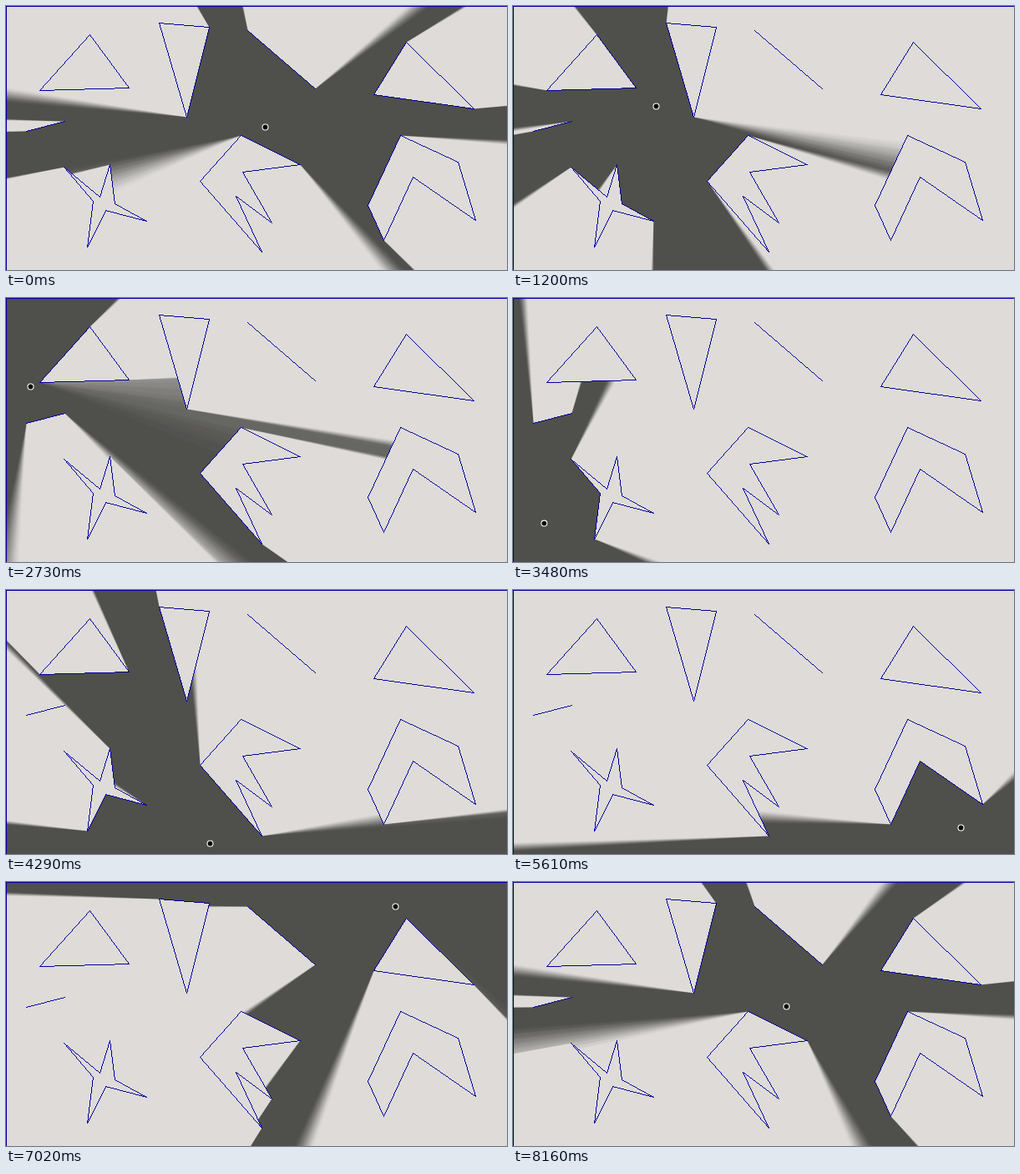
These frames come from a looping animation (600 by 317 pixels, 8.19 s). An HTML page with a canvas:

```html
<!DOCTYPE html>
<html lang="en">
<head>
<meta charset="utf-8">
<title>Soft visibility</title>
<style>
html, body { margin: 0; width: 100%; height: 100%; overflow: hidden; background: #dedbd9; }
canvas { display: block; }
</style>
</head>
<body>
<canvas id="stage" width="600" height="317"></canvas>
<script>
const W = 600, H = 317, LOOP = 8190, STEP = 30;
const LIGHT = '#dedbd9', DARK = '#4f4f4c', LINE = '#000099';
const SAMPLES = 51, RADIUS = 4.2;

const shapes = [
  [[0, 0], [W, 0], [W, H], [0, H]],
  [[100, 34], [147, 98], [40, 101]],
  [[183, 20], [243, 25], [216, 133]],
  [[289, 29], [370, 99]],
  [[479, 43], [560, 123], [440, 106]],
  [[24, 150], [70, 138]],
  [[69, 193], [112, 229], [124, 190], [130, 237], [168, 258], [119, 245], [97, 289], [104, 234]],
  [[281, 155], [352, 190], [283, 199], [318, 260], [275, 228], [306, 295], [232, 210]],
  [[472, 155], [541, 187], [562, 257], [487, 205], [452, 281], [433, 239]]
];

// time in ms, x, y, velocity in pixels per step
const path = [
  [0, 310, 145, -3, 0],
  [1200, 171, 120, 0, -4],
  [1950, 98, 15, -5, 0],
  [2730, 29, 106, -1.5, 4.5],
  [3060, 12, 160, 0, 7],
  [3750, 90, 304, 8, 0],
  [4290, 244, 304, 5, 0],
  [5610, 536, 285, 5.5, -0.5],
  [5970, 586, 215, 1, -7.5],
  [7020, 466, 29, -4, -0.5],
  [8160, 327, 149, -3.5, 1.2]
];

function makeCanvas() {
  const c = document.createElement('canvas');
  c.width = W;
  c.height = H;
  return c;
}

const ctx = document.getElementById('stage').getContext('2d');
const mask = makeCanvas(), mctx = mask.getContext('2d');

const points = shapes.flat().map(([x, y]) => [x + 0.5, y + 0.5]);
const walls = [];
for (const s of shapes) {
  const count = s.length === 2 ? 1 : s.length;
  for (let i = 0; i < count; i++) {
    const [ax, ay] = s[i], [bx, by] = s[(i + 1) % s.length];
    walls.push({ x: ax + 0.5, y: ay + 0.5, dx: bx - ax, dy: by - ay });
  }
}

// Crisp one-pixel outlines
const outlines = makeCanvas();
const octx = outlines.getContext('2d');
octx.fillStyle = LINE;
for (const w of walls) {
  const n = Math.max(Math.abs(w.dx), Math.abs(w.dy));
  for (let i = 0; i <= n; i++) {
    octx.fillRect(Math.floor(w.x + w.dx * i / n), Math.floor(w.y + w.dy * i / n), 1, 1);
  }
}

function position(t) {
  const first = path[0];
  if (t < 0) return [first[1] + first[3] * t / STEP, first[2] + first[4] * t / STEP];
  let i = 0;
  while (i < path.length - 2 && t >= path[i + 1][0]) i++;
  const a = path[i], b = path[i + 1];
  const span = b[0] - a[0], n = span / STEP, s = (t - a[0]) / span;
  const s2 = s * s, s3 = s2 * s;
  const blend = k => (2 * s3 - 3 * s2 + 1) * a[k] + (3 * s2 - 2 * s3) * b[k]
    + n * ((s3 - 2 * s2 + s) * a[k + 2] + (s3 - s2) * b[k + 2]);
  return [blend(1), blend(2)];
}

function castRay(x, y, angle) {
  const rx = Math.cos(angle), ry = Math.sin(angle);
  let near = 1000;
  for (const w of walls) {
    const det = rx * w.dy - ry * w.dx;
    if (Math.abs(det) < 1e-9) continue;
    const ox = w.x - x, oy = w.y - y;
    const dist = (ox * w.dy - oy * w.dx) / det;
    if (dist <= 0 || dist >= near) continue;
    const along = (ox * ry - oy * rx) / det;
    if (along >= 0 && along <= 1) near = dist;
  }
  return [x + rx * near, y + ry * near];
}

function fillVisible(x, y) {
  const angles = [];
  for (const [px, py] of points) {
    const a = Math.atan2(py - y, px - x);
    angles.push(a - 1e-4, a + 1e-4);
  }
  angles.sort((a, b) => a - b);
  mctx.beginPath();
  for (const a of angles) mctx.lineTo(...castRay(x, y, a));
  mctx.fill();
}

// Each sample on the disc adds an equal share of coverage
function drawView(x, y) {
  mctx.globalCompositeOperation = 'source-over';
  mctx.clearRect(0, 0, W, H);
  mctx.globalCompositeOperation = 'lighter';
  mctx.fillStyle = `rgba(0, 0, 0, ${1 / SAMPLES})`;
  for (let i = 0; i < SAMPLES; i++) {
    const r = RADIUS * Math.sqrt((i + 0.5) / SAMPLES), a = i * 2.399963;
    fillVisible(
      Math.min(W - 1, Math.max(1, x + r * Math.cos(a))),
      Math.min(H - 1, Math.max(1, y + r * Math.sin(a)))
    );
  }
  mctx.globalCompositeOperation = 'source-in';
  mctx.fillStyle = DARK;
  mctx.fillRect(0, 0, W, H);
  ctx.drawImage(mask, 0, 0);
}

function dot(x, y, r, color) {
  ctx.fillStyle = color;
  ctx.beginPath();
  ctx.arc(x, y, r, 0, Math.PI * 2);
  ctx.fill();
}

function draw(t) {
  const [x, y] = position(t).map(v => v + 0.5);
  const [ex, ey] = position(t - STEP).map(v => v + 0.5); // the view trails the dot by one step
  ctx.fillStyle = LIGHT;
  ctx.fillRect(0, 0, W, H);
  drawView(ex, ey);
  ctx.drawImage(outlines, 0, 0);
  dot(x, y, 4, '#fff');
  dot(x, y, 2.9, '#000');
}

let last = -1;
const start = performance.now();
function tick() {
  const t = Math.floor(((performance.now() - start) % LOOP) / STEP) * STEP;
  if (t !== last) {
    last = t;
    draw(t);
  }
  requestAnimationFrame(tick);
}
tick();
</script>
</body>
</html>
```
